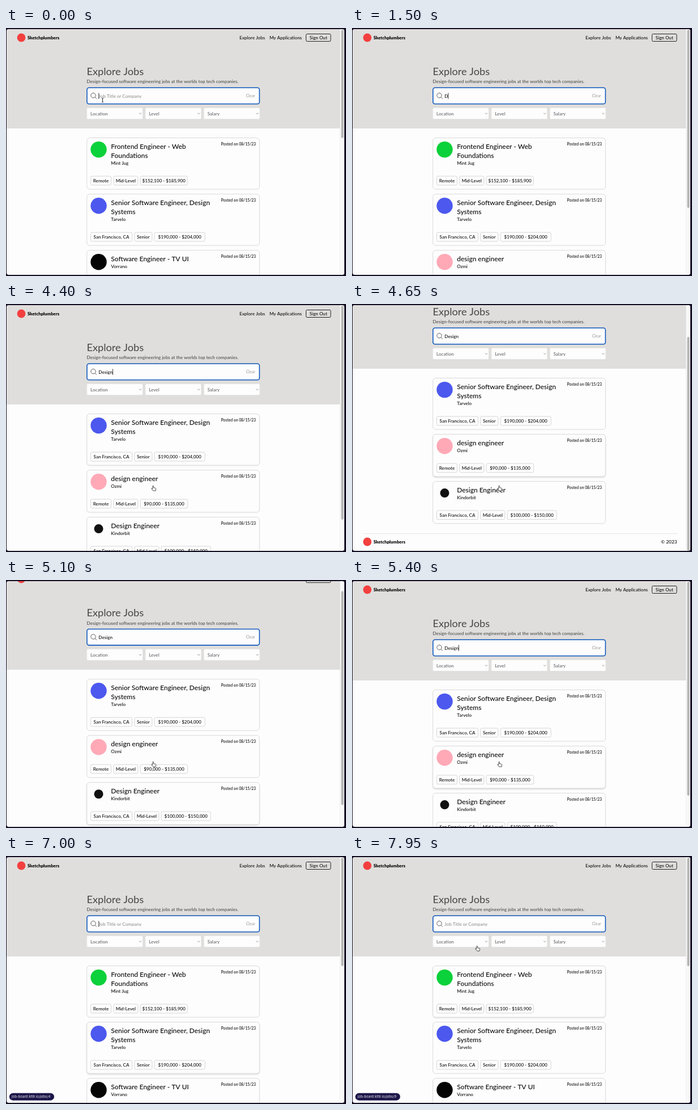
An HTML page with a canvas that plays this animation: 600 px wide and 437 px high, repeating every 8 s.

```html
<!DOCTYPE html>
<html lang="en">
<head>
<meta charset="utf-8">
<title>Explore Jobs</title>
<style>
html, body { margin: 0; width: 100%; height: 100%; overflow: hidden; background: #150f22; }
canvas { display: block; width: 600px; height: 437px; }
</style>
</head>
<body>
<canvas id="stage"></canvas>
<script>
const W = 600, H = 437, LOOP = 8000;
const VIEW = { x: 1, y: 2, w: 596, h: 433 };
const SANS = 'Lato, "Open Sans", sans-serif';
const BRAND = 'Sketchplumbers';
const INK = '#0c0c0c', LINE = '#d9d9d9';

const canvas = document.getElementById('stage');
const ctx = canvas.getContext('2d');
const dpr = window.devicePixelRatio || 1;
canvas.width = W * dpr;
canvas.height = H * dpr;

// Chips are [label, width].
const SF = ['San Francisco, CA', 73], REMOTE = ['Remote', 36], MID = ['Mid-Level', 43];
const jobs = {
  web: { title: ['Frontend Engineer - Web', 'Foundations'], company: 'Mint Jug', color: '#0bd13a',
         chips: [REMOTE, MID, ['$152,100 - $185,900', 83]] },
  systems: { title: ['Senior Software Engineer, Design', 'Systems'], company: 'Tarvelo', color: '#4c58ee',
             chips: [SF, ['Senior', 31], ['$190,000 - $204,000', 89]] },
  tv: { title: ['Software Engineer - TV UI'], company: 'Vorrano', color: '#050505', chips: [] },
  plain: { title: ['design engineer'], company: 'Ozmi', color: '#ffa9b7',
           chips: [REMOTE, MID, ['$90,000 - $135,000', 83.5]] },
  capital: { title: ['Design Engineer'], company: 'Kindorbit', color: '#111', radius: 8,
             chips: [SF, MID, ['$100,000 - $150,000', 87]] }
};

// Results depend on how many letters have been typed.
const results = [
  { list: [jobs.web, jobs.systems, jobs.tv], height: 976 },
  { list: [jobs.web, jobs.systems, jobs.plain, jobs.capital], height: 595 },
  { list: [jobs.systems, jobs.plain, jobs.capital], height: 496 }
];

// Time of each key press and the letters left in the field.
const WORD = 'Design';
const keys = [[-300, 0], [1500, 1], [1850, 2], [1900, 3], [1950, 4], [3000, 5], [3120, 6],
              [6150, 5], [6300, 4], [6450, 3], [6600, 2], [6800, 1], [7000, 0]];

const scrollKeys = [[4450, 0], [4500, 8], [4550, 28], [4600, 51], [4650, 63], [4950, 63],
                    [5000, 52], [5100, 19], [5200, 6], [5300, 1.5], [5400, 0]];

// Card slot, hover start, hover end.
const hovers = [[0, 4150, 4300], [1, 4380, 4700], [2, 4700, 5180], [1, 5180, 7600], [0, 7600, 7900]];

const clamp = (v, a = 0, b = 1) => Math.min(b, Math.max(a, v));
const ease = p => p * p * (3 - 2 * p);
const span = (t, a, b) => clamp((t - a) / (b - a));
const mix = (a, b, p) => a + (b - a) * p;

function track(points, t) {
  if (t <= points[0][0]) return points[0][1];
  for (let i = 1; i < points.length; i++) {
    const [t0, v0] = points[i - 1], [t1, v1] = points[i];
    if (t < t1) return mix(v0, v1, (t - t0) / (t1 - t0));
  }
  return points[points.length - 1][1];
}

function text(str, x, y, size, color = INK, align = 'left', weight = 500, family = SANS) {
  ctx.font = `${weight} ${size}px ${family}`;
  ctx.fillStyle = color;
  ctx.textAlign = align;
  ctx.fillText(str, x, y);
}

function box(x, y, w, h, r, fill, stroke, line = 1) {
  ctx.beginPath();
  ctx.roundRect(x, y, w, h, r);
  if (fill) { ctx.fillStyle = fill; ctx.fill(); }
  if (stroke) { ctx.strokeStyle = stroke; ctx.lineWidth = line; ctx.stroke(); }
}

function disc(x, y, r, color) {
  ctx.beginPath();
  ctx.arc(x, y, r, 0, Math.PI * 2);
  ctx.fillStyle = color;
  ctx.fill();
}

function stroke(points, color, width) {
  ctx.beginPath();
  points.forEach(([x, y]) => ctx.lineTo(x, y));
  ctx.strokeStyle = color;
  ctx.lineWidth = width;
  ctx.stroke();
}

function brand(y) {
  disc(27, y, 7.4, '#f2403f');
  text(BRAND, 38, y + 3.2, 7.75, '#080808', 'left', 900);
}

function header() {
  ctx.fillStyle = '#dfdedc';
  ctx.fillRect(0, -100, W, 277);
  brand(17);
  text('Explore Jobs', 412, 20, 8.1);
  text('My Applications', 465, 20, 8);
  box(529.5, 10.5, 43.5, 13, 2, null, '#222', 1);
  text('Sign Out', 551.3, 20, 8.1, INK, 'center');
  text('Explore Jobs', 142.5, 83.3, 18.2, '#484746', 'left', 400);
  text('Design-focused software engineering jobs at the worlds top tech companies.',
       142.5, 97.4, 7.98, '#4c4b4a');
}

function searchField(value, caret) {
  box(142.9, 105.3, 304.4, 28.4, 3.5, '#fdfdfd', '#1259be', 1.6);
  ctx.beginPath();
  ctx.arc(154, 118.8, 4.2, 0, Math.PI * 2);
  ctx.strokeStyle = '#5f5f5f';
  ctx.lineWidth = 1;
  ctx.stroke();
  stroke([[157, 121.8], [160, 124.8]], '#5f5f5f', 1);
  if (value) text(value, 163.3, 122.5, 8.1);
  else text('Job Title or Company', 163.3, 122.5, 8.1, '#909090');
  if (caret) {
    ctx.font = `500 8.1px ${SANS}`;
    ctx.fillStyle = '#222';
    ctx.fillRect(163.3 + ctx.measureText(value).width, 114.5, 0.9, 10.5);
  }
  text('Clear', 439.5, 122, 7, '#a0a0a0', 'right');
}

function filters() {
  ['Location', 'Level', 'Salary'].forEach((label, i) => {
    const x = 142.7 + i * 103.2;
    box(x, 140.7, 98.7, 19.8, 2, '#fdfdfd', '#e4e4e4', 0.8);
    text(label, x + 6.3, 153.6, 8.1, '#646468');
    stroke([[x + 92.3, 149.7], [x + 94.3, 151.7], [x + 96.3, 149.7]], '#777', 0.8);
  });
}

function card(job, y, glow) {
  const two = job.title.length - 1;
  const h = 74.3 + two * 16.2;
  if (glow > 0) {
    ctx.save();
    ctx.shadowColor = `rgba(0,0,0,${0.18 * glow})`;
    ctx.shadowBlur = 3 * dpr;
    ctx.shadowOffsetY = 1.5 * dpr;
    box(142.7, y, 304.6, h, 5, '#fdfdfd');
    ctx.restore();
  }
  box(142.7, y, 304.6, h, 5, '#fdfdfd', LINE, 1);
  disc(163.5, y + 20.5, job.radius || 14.2, job.color);
  job.title.forEach((line, i) => text(line, 185.3, y + 19.4 + i * 16, 11.95));
  text(job.company, 185.3, y + 31.1 + two * 16.4, 8.1);
  text('Posted on 08/15/23', 441, y + 13.5, 6.8, INK, 'right');
  let x = 149.5;
  for (const [label, w] of job.chips) {
    box(x, y + h - 23, w, 15.8, 2.5, null, '#d2d2d2', 0.9);
    text(label, x + w / 2, y + h - 12.2, 8.05, INK, 'center');
    x += w + 4.3;
  }
  return y + h + 8.6;
}

function footer(bottom) {
  stroke([[20, bottom - 30.5], [574, bottom - 30.5]], '#e6e6e6', 1);
  brand(bottom - 16);
  text('© 2023', 573.5, bottom - 12.8, 8.3, INK, 'right');
}

function scrollbar(scroll, height) {
  ctx.fillStyle = '#f9f9f9';
  ctx.fillRect(589.5, 0, 8, H);
  ctx.fillStyle = '#e9e9e9';
  ctx.fillRect(589.3, 0, 0.7, H);
  const len = VIEW.h * VIEW.h / height;
  box(591.5, VIEW.y + 1 + scroll * VIEW.h / height, 4.2, len - 1, 2.1, '#b6b6b6');
}

function statusPill(t) {
  ctx.globalAlpha = span(t, 5480, 5640);
  box(6, 418, 78.8, 12.4, 6.2, '#1b1647', '#3b356a', 0.6);
  text(`job-board.kttlr.io/jobs/${t < 7600 ? 4 : 9}`, 10, 426.4, 6, '#cfcde0',
       'left', 500, 'Inter, sans-serif');
  ctx.globalAlpha = 1;
}

function shape(x, y, path) {
  ctx.save();
  ctx.translate(x, y);
  const p = new Path2D(path);
  ctx.lineJoin = 'round';
  ctx.fillStyle = '#fff';
  ctx.fill(p);
  ctx.strokeStyle = '#222';
  ctx.lineWidth = 0.8;
  ctx.stroke(p);
  ctx.restore();
}

const hand = (x, y) => shape(x, y,
  'M-1.8 .8V-3.6Q-1.8-4.6-1-4.6T-.2-3.6V-1.2L2.8-.6Q4-.3 3.9 1L3.4 4.3H-.9L-3.6 1Q-4.2-.2-3-.1Z');
const arrow = (x, y) => shape(x, y, 'M-2-4.5V3.3L-.2 1.7L1 4.3L2.2 3.8L1 1.3H3.5Z');

function beam(x, y) {
  stroke([[x, y - 3.3], [x, y + 3.3]], '#111', 0.9);
  for (const s of [-1, 1]) {
    stroke([[x - 1.7, y + s * 3.8], [x, y + s * 3], [x + 1.7, y + s * 3.8]], '#111', 0.8);
  }
}

// The pointer hides while typing and returns when moved.
function pointer(t) {
  if (t < 1500) return beam(170.5, 127.3);
  if (t >= 3750 && t < 6150) {
    const p = ease(span(t, 3750, 4350));
    const x = mix(170.5, 260.6, p), y = mix(127.3, 324.8, p);
    if (y < 134) beam(x, y);
    else if (y < 193) arrow(x, y);
    else hand(x, y);
  } else if (t >= 7400) {
    const p = ease(span(t, 7400, 7950));
    hand(mix(260.6, 221.6, p), mix(324.8, 163, p));
  }
}

function glowOf(slot, t) {
  return hovers.reduce((g, [s, a, b]) =>
    s === slot ? Math.max(g, span(t, a, a + 150) * (1 - span(t, b, b + 150))) : g, 0);
}

function draw(t) {
  const [pressed, count] = keys.filter(k => k[0] <= t).pop();
  const caret = (t - pressed) % 1000 < 500;
  const { list, height } = results[Math.min(count, 2)];
  const scroll = track(scrollKeys, t);

  ctx.setTransform(dpr, 0, 0, dpr, 0, 0);
  ctx.fillStyle = '#150f22';
  ctx.fillRect(0, 0, W, H);

  ctx.save();
  ctx.beginPath();
  ctx.roundRect(VIEW.x, VIEW.y, VIEW.w, VIEW.h, 4);
  ctx.clip();
  ctx.fillStyle = '#fdfdfd';
  ctx.fillRect(0, 0, W, H);

  ctx.save();
  ctx.translate(0, -scroll);
  header();
  searchField(WORD.slice(0, count), caret);
  filters();
  let y = 193.6;
  list.forEach((job, i) => { y = card(job, y, glowOf(i, t)); });
  footer(VIEW.y + height);
  ctx.restore();

  scrollbar(scroll, height);
  if (t > 5480) statusPill(t);
  pointer(t);
  ctx.restore();
}

const start = performance.now();
function frame() {
  draw((performance.now() - start) % LOOP);
  requestAnimationFrame(frame);
}
frame();
</script>
</body>
</html>
```
